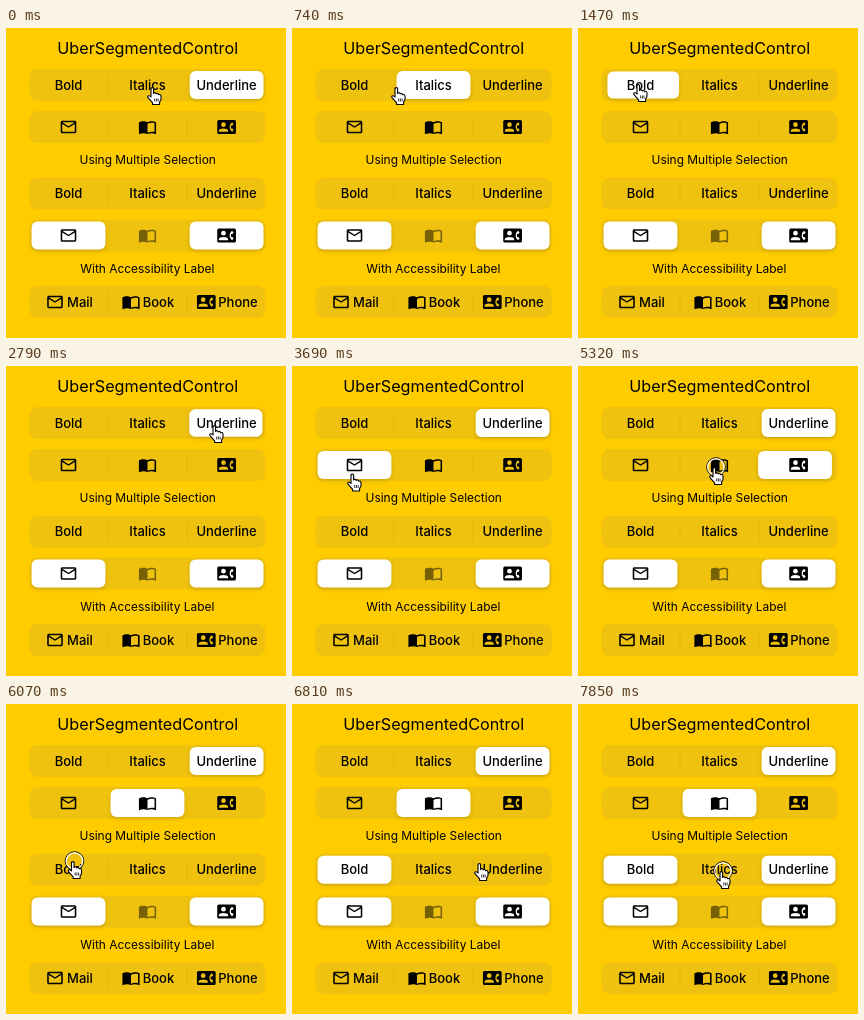
An HTML page that plays this animation: 280x310 px, repeating every 7.99 s.

```html
<!DOCTYPE html>
<html lang="en">
<head>
<meta charset="utf-8">
<title>Segmented controls</title>
<style>
  html, body { margin: 0; width: 100%; height: 100%; overflow: hidden; background: #fc0; }
  svg { display: block; width: 280px; height: 310px; }
  text { font: 500 13px Inter, Roboto, sans-serif; text-anchor: middle; }
  .title { font-size: 16.2px; font-weight: 400; }
  .caption { font-size: 11.95px; font-weight: 400; }
  .track { fill: #efc20f; }
  .divider { fill: #e0b717; }
  .thumb { fill: #fff; filter: drop-shadow(0 2px 2px rgba(0, 0, 0, .13)); }
  .dim { opacity: .5; }
</style>
</head>
<body>
<svg id="stage" viewBox="0 0 280 310">
  <defs>
    <path id="mail" d="M20 4H4c-1.1 0-2 .9-2 2v12c0 1.1.9 2 2 2h16c1.1 0 2-.9 2-2V6c0-1.1-.9-2-2-2zm0 14H4V8l8 5 8-5v10zm-8-7L4 6h16l-8 5z"/>
    <path id="book" fill-rule="evenodd" d="M12 6C9.5 4 4 4 1 6v14.6q0 .8 .8 .5C5 19.5 9 19.5 12 21c3-1.5 7-1.5 10.2 .1q.8 .2 .8-.5V6C20 4 14.5 4 12 6zM21 18.5c-3-.9-6.500-.4-9 1V8c2.5-1.5 6-2 9-1z"/>
    <g id="contact">
      <rect y="3" width="24" height="18" rx="2"/>
      <g fill="var(--back)">
        <circle cx="8" cy="9" r="3"/>
        <path d="M2 18v-1c0-4.1 12-4.1 12 0v1z"/>
        <path d="M19 6L21 8 19.5 10h-1.6q-.8 2 0 4h1.6L21 16l-2 2c-4-3-4-9 0-12z"/>
      </g>
    </g>
  </defs>
  <text class="title" x="141.7" y="26">UberSegmentedControl</text>
  <text class="caption" x="141.7" y="136.3">Using Multiple Selection</text>
  <text class="caption" x="141.3" y="245">With Accessibility Label</text>
  <g id="rows"></g>
  <g id="cursor">
    <g id="ring" fill="none">
      <circle cx="7" r="9.3" stroke="#111"/>
      <circle cx="7" r="8.2" stroke="#fff" stroke-width="1.2"/>
    </g>
    <path fill="#fff" stroke="#000" stroke-width="1.1" stroke-linejoin="round"
      d="M4 10V2Q4 .6 5.3 .6T6.6 2V6.5Q7 5.5 8 5.7T9.2 7Q9.8 6.2 10.7 6.5T11.7 7.8Q12.2 7.3 13 7.6T14 9V12.5L12.6 15V17.5H5.6V15.8L1 10.6Q.3 9.3 1.4 8.8T4 10z"/>
    <path fill="none" stroke="#000" stroke-width=".8" d="M7.7 11.5v3M9.4 11.5v3M11.1 11.5v3"/>
  </g>
</svg>
<script>
const DURATION = 7990, STEP = 148, LAST_STEP = 53;
const CENTERS = [62.5, 141.5, 220.6];
const WORDS = ['Bold', 'Italics', 'Underline'];
const ICONS = ['mail', 'book', 'contact'];
const LABELS = [[74, 'Mail'], [152.5, 'Book'], [232, 'Phone']];

// Each move: [step of the press, destination segment].
const SLIDES = {
  styles: { first: 0, start: 2, moves: [[1, 1], [8, 0], [16, 2]] },
  icons: { first: 25, start: 0, moves: [[31, 2], [36, 1]] }
};
const PROGRESS = [.045, .86, .965, .995, 1];
const SCALE = [1, .97, .97, .99, 1];
const CLICKS = [1, 8, 16, 24, 31, 36, 41, 48, 53];
// Cursor stops: [step, x, y].
const PATH = [
  [0, 141, 59], [2, 141, 60], [8, 57, 58], [10, 55, 56], [11, 55, 56],
  [16, 204, 59], [19, 203, 59], [24, 55, 108], [26, 55, 107],
  [30, 206, 97], [33, 206, 97], [36, 131, 101], [37, 131, 101],
  [40, 62, 157], [42, 61, 157], [46, 182, 159], [48, 195, 157],
  [49, 195, 157], [53, 138, 167]
];

const $ = id => document.getElementById(id);

function add(parent, tag, attrs, text = '') {
  const node = document.createElementNS('http://www.w3.org/2000/svg', tag);
  for (const key in attrs) node.setAttribute(key, attrs[key]);
  node.textContent = text;
  return parent.appendChild(node);
}

function icon(parent, name, x, extra = {}) {
  return add(parent, 'use', {
    href: '#' + name, transform: `translate(${x} 0) scale(.78) translate(-12 -12)`, ...extra
  });
}

function thumb(parent) {
  return add(parent, 'rect', { class: 'thumb', x: -36.9, y: -14, width: 73.8, height: 28, rx: 6 });
}

function place(node, x, scale = 1) {
  node.setAttribute('transform', `translate(${x} 0) scale(${scale})`);
}

function makeRow(y, thumbCount) {
  const g = add($('rows'), 'g', { transform: `translate(0 ${y})` });
  add(g, 'rect', { class: 'track', x: 23.5, y: -16, width: 236, height: 32, rx: 8 });
  const dividers = [101.5, 180.5].map(x =>
    add(g, 'rect', { class: 'divider', x, y: -10, width: 1, height: 20 }));
  const thumbs = Array.from({ length: thumbCount }, () => thumb(g));
  return { g, dividers, thumbs };
}

function addWords({ g }) {
  WORDS.forEach((word, i) => add(g, 'text', { x: CENTERS[i], y: 4.6 }, word));
}

function addIcons({ g }, dimmed) {
  return ICONS.map((name, i) =>
    icon(g, name, CENTERS[i], { class: i === dimmed ? 'dim' : '', style: '--back:#efc20f' }));
}

function showDividers(row, selected) {
  row.dividers.forEach((node, i) => {
    node.style.opacity = selected.includes(i) || selected.includes(i + 1) ? 0 : 1;
  });
}

const styleRow = makeRow(57, 1);
const iconRow = makeRow(99, 1);
const multiStyleRow = makeRow(165.7, 2);
const multiIconRow = makeRow(207.5, 2);
const labelRow = makeRow(274, 0);

addWords(styleRow);
const icons = addIcons(iconRow);
addWords(multiStyleRow);
const multiIcons = addIcons(multiIconRow, 1);
multiIcons[2].style.setProperty('--back', '#fff');
LABELS.forEach(([x, word], i) => {
  icon(labelRow.g, ICONS[i], [49, 125, 200.3][i], { style: '--back:#efc20f' });
  add(labelRow.g, 'text', { x, y: 4.6 }, word);
});
for (const row of [multiStyleRow, multiIconRow]) {
  row.thumbs.forEach((node, i) => place(node, CENTERS[i * 2]));
}
showDividers(multiIconRow, [0, 2]);

function drawSlide(row, { first, start, moves }, step) {
  let from = start, to = start, age = PROGRESS.length;
  for (const [at, target] of moves) {
    if (step < at) break;
    from = to;
    to = target;
    age = step - at;
  }
  const i = Math.min(age, PROGRESS.length - 1);
  const visible = step >= first;
  const selected = age === 0 ? from : to;
  place(row.thumbs[0], CENTERS[from] + (CENTERS[to] - CENTERS[from]) * PROGRESS[i], SCALE[i]);
  row.thumbs[0].style.opacity = visible ? 1 : 0;
  showDividers(row, visible ? [selected] : []);
  return visible ? selected : -1;
}

function cursorAt(step) {
  const next = Math.max(1, PATH.findIndex(([at]) => at >= step));
  const [t0, x0, y0] = PATH[next - 1], [t1, x1, y1] = PATH[next];
  const t = (step - t0) / (t1 - t0), ease = t * t * (3 - 2 * t);
  return [x0 + (x1 - x0) * ease, y0 + (y1 - y0) * ease];
}

function draw(time) {
  const step = Math.min(LAST_STEP, Math.floor(time % DURATION / STEP + .16));
  drawSlide(styleRow, SLIDES.styles, step);
  const selected = drawSlide(iconRow, SLIDES.icons, step);
  icons[2].style.setProperty('--back', selected === 2 ? '#fff' : '#efc20f');

  const chosen = [];
  if (step >= 42) chosen.push(0);
  if (step >= 49) chosen.push(2);
  multiStyleRow.thumbs.forEach((node, i) => {
    node.style.opacity = chosen.includes(i * 2) ? 1 : 0;
  });
  showDividers(multiStyleRow, chosen);

  $('cursor').setAttribute('transform', `translate(${cursorAt(step)})`);
  $('ring').style.opacity = CLICKS.includes(step) ? 1 : 0;
}

const begin = performance.now();
function tick() {
  draw(performance.now() - begin);
  requestAnimationFrame(tick);
}
tick();
</script>
</body>
</html>
```
